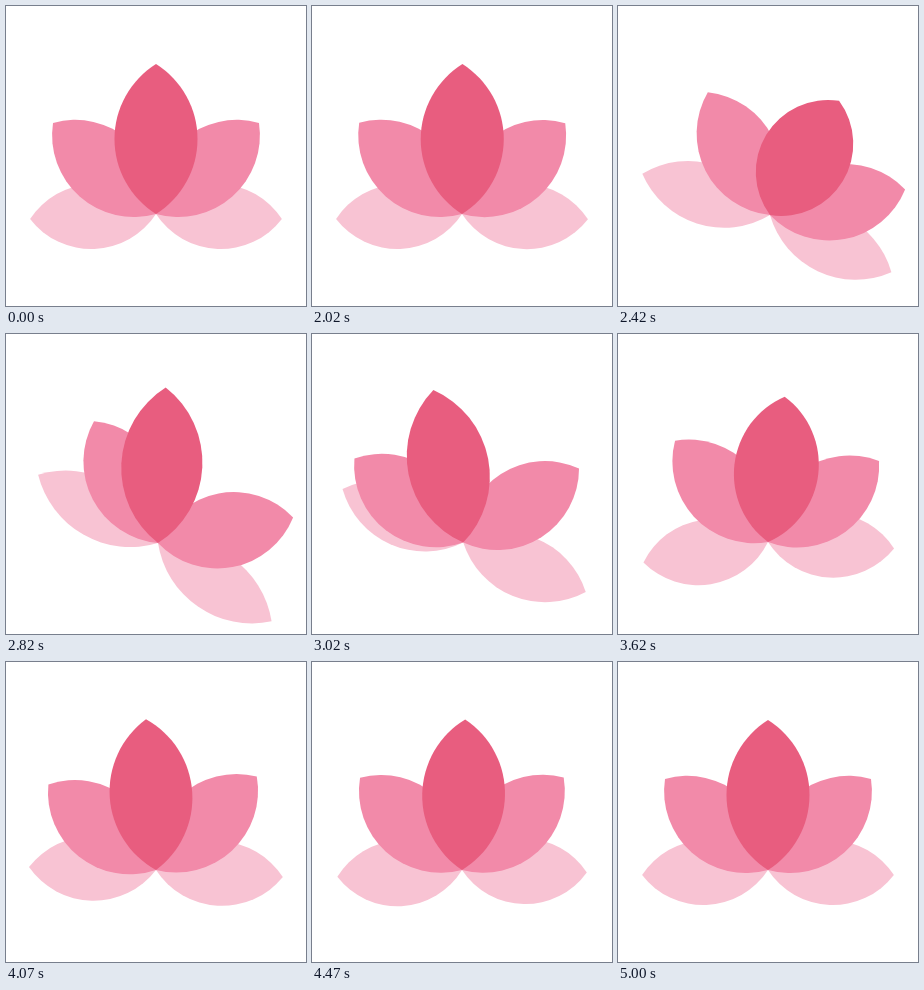
Write an HTML page that moves like this. It is 300x300 px and loops after 5020 ms.

```html
<!DOCTYPE html>
<html lang="en">
<head>
<meta charset="utf-8">
<title>Lotus</title>
<style>
  html, body { margin: 0; width: 100%; height: 100%; overflow: hidden; background: #fff; }
  svg { display: block; width: 100%; height: 100%; }
</style>
</head>
<body>
<svg id="stage" viewBox="0 0 300 300"></svg>
<script>
const LOOP = 5020;
const GUST = 2000;   // the breeze arrives
const CALM = 5000;   // everything is at rest again

// Eased 0..1 progress from time a to time b
function ease(t, a, b) {
  const u = Math.min(1, Math.max(0, (t - a) / (b - a)));
  return (1 - Math.cos(Math.PI * u)) / 2;
}

// Pushed to peak, held until release, thrown back to rebound, then a fading wobble
function sway(peak, top, release, rebound, back, wave = 1020) {
  return t => {
    if (t < release) return peak * ease(t, GUST, top);
    if (t < back) return peak + (rebound - peak) * ease(t, release, back);
    const fade = Math.max(0, (CALM - t) / (CALM - back)) ** 1.5;
    return rebound * fade * Math.cos(2 * Math.PI * (t - back) / wave);
  };
}

const still = () => 0;
const drift = sway(2, 2350, 2850, 0, 3250);
const outerStretch = sway(12, 2680, 2820, -7.5, 3360);
const middleStretch = sway(-16.7, 2400, 2400, 7, 2900, 1400);

const outer = { fill: '#f8c3d3', length: 126, half: 32.5, squash: 1, stretch: outerStretch };
const side = { fill: '#f28aa9', length: 137.5, half: 37.5, squash: 0, stretch: still };
const middle = { fill: '#e85d7f', length: 150, half: 41.5, squash: 0.65, stretch: middleStretch };

// Back to front; angles in degrees clockwise from upright
const petals = [
  { ...outer, rest: -92.3, swing: sway(32, 2720, 2820, -7, 3620) },
  { ...outer, rest: 92.3, swing: sway(32.3, 2660, 2820, -8, 3350) },
  { ...side, rest: -48.5, swing: sway(23, 2500, 2760, -9.5, 3120) },
  { ...side, rest: 48.5, swing: sway(32, 2480, 2770, -12.5, 3260) },
  { ...middle, rest: 0, swing: sway(31.5, 2450, 2450, -11.5, 3060) }
];

// Pointed lens made of two equal arcs
function lens(length, half) {
  const r = (length * length / 4 + half * half) / (2 * half);
  return `M0 0A${r} ${r} 0 0 1 0 ${-length}A${r} ${r} 0 0 1 0 0Z`;
}

const stage = document.getElementById('stage');
for (const petal of petals) {
  petal.node = document.createElementNS('http://www.w3.org/2000/svg', 'path');
  petal.node.setAttribute('fill', petal.fill);
  stage.append(petal.node);
}

function draw(t) {
  const shift = drift(t);
  const base = `translate(${150 + shift} ${208 + shift / 2})`;
  for (const { node, length, half, squash, stretch, rest, swing } of petals) {
    const long = length + stretch(t);
    node.setAttribute('d', lens(long, half * (length / long) ** squash));
    node.setAttribute('transform', `${base} rotate(${rest + swing(t)})`);
  }
}

const start = performance.now();
function tick() {
  draw((performance.now() - start) % LOOP);
  requestAnimationFrame(tick);
}
tick();
</script>
</body>
</html>
```
